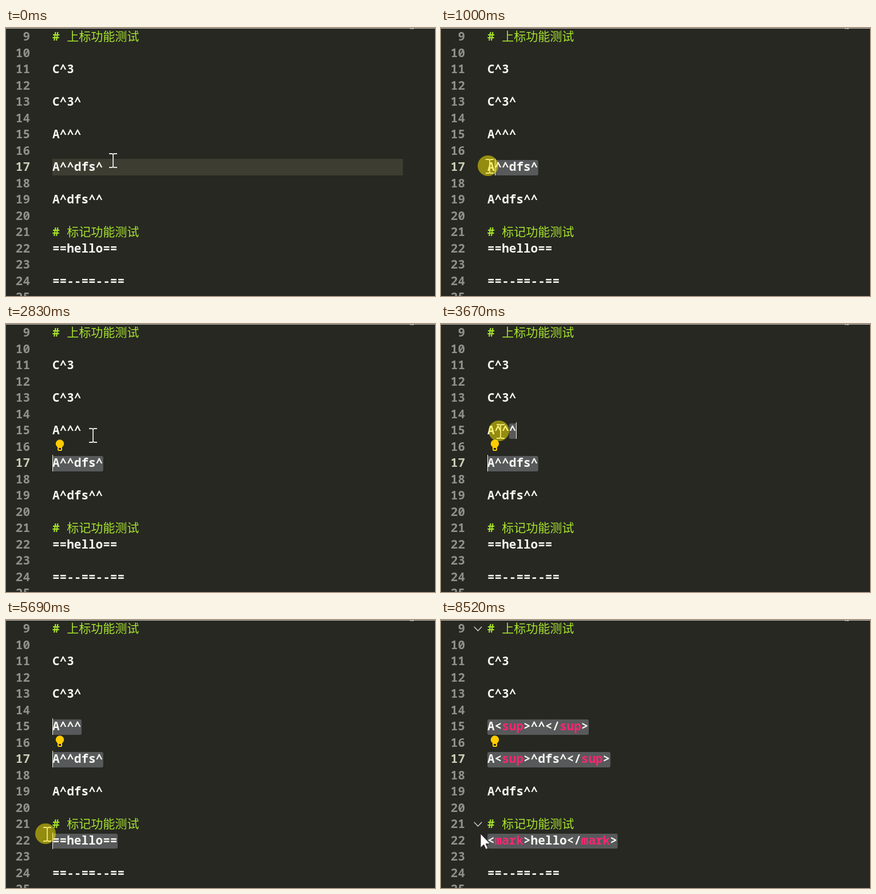
Animation, 749 px wide and 469 px high, one loop 8.7 s. Source, as an HTML page:

```html
<!DOCTYPE html>
<html lang="zh">
<head>
<meta charset="utf-8">
<style>
html, body { margin: 0; width: 100%; height: 100%; overflow: hidden; background: #272822; }
svg { display: block; }
text { font: bold 21px "Noto Sans Mono", "DejaVu Sans Mono", monospace; fill: #f8f8f2; white-space: pre; }
.num { fill: #90908a; text-anchor: end; }
.on { fill: #c8ccb4; }
.head { fill: #a6e22e; }
.han { font: 21px "Noto Sans CJK SC", "Noto Sans CJK", sans-serif; }
.tag { fill: #f92672; }
.sel { fill: #57595a; }
</style>
</head>
<body>
<svg id="stage" width="749" height="469" viewBox="0 0 749 469"></svg>
<script>
const LOOP = 8700, LEFT = 81, CH = 12.6, LINE = 28.5;
const EDIT = 7020;

// Screen capture of the pointer: time, x, y, kind
// i = beam, d = dragging beam, p = pressed beam, a = arrow
const pointer = [
  [0, 187, 232, 'i'], [160, 170, 238, 'i'], [350, 141, 231, 'd'],
  [530, 111, 227, 'd'], [670, 96, 233, 'd'], [840, 87, 238, 'd'],
  [1000, 82, 241, 'd'], [1170, 80, 242, 'p'], [1830, 81, 244, 'p'],
  [2000, 84, 246, 'p'], [2170, 86, 248, 'p'], [2500, 88, 250, 'i'],
  [2830, 152, 195, 'i'], [3170, 140, 189, 'i'], [3340, 134, 188, 'p'],
  [3510, 122, 188, 'd'], [3670, 101, 187, 'd'], [3840, 76, 187, 'd'],
  [4010, 71, 187, 'a'], [4360, 104, 250, 'i'], [4530, 170, 340, 'i'],
  [4690, 212, 378, 'i'], [4840, 224, 386, 'i'], [5000, 222, 385, 'i'],
  [5170, 220, 384, 'i'], [5340, 217, 383, 'p'], [5500, 142, 379, 'd'],
  [5690, 69, 374, 'd'], [6020, 69, 374, 'a']
];

// Selection start and caret column on each edited row: time, start, caret
const selections = {
  15: [[3340, 4, 4], [3670, 3, 4], [3840, 0, 0]],
  17: [[350, 5, 5], [530, 0, -1], [670, 2, 2], [840, 1, 1], [1330, 0, 0]],
  22: [[5340, 9, 9], [5500, 4, 4], [5690, 0, 0]]
};

const before = {
  9: '# 上标功能测试', 11: 'C^3', 13: 'C^3^', 15: 'A^^^', 17: 'A^^dfs^',
  19: 'A^dfs^^', 21: '# 标记功能测试', 22: '==hello==', 24: '==--==--=='
};
const after = {
  ...before,
  15: 'A<sup>^^</sup>', 17: 'A<sup>^dfs^</sup>', 22: '<mark>hello</mark>'
};

const at = (keys, t) => keys.filter(k => k[0] <= t).pop();
const rowTop = row => 229 + (row - 17) * LINE;
const base = row => Math.round(rowTop(row) + 21);
const col = n => LEFT + n * CH;
const esc = s => s.replace(/</g, '&lt;').replace(/>/g, '&gt;');
const text = (x, row, s, cls = '') => `<text x="${x}" y="${base(row)}" class="${cls}">${s}</text>`;
const rect = (x, y, w, h, attr) => `<rect x="${x}" y="${y}" width="${w}" height="${h}" ${attr}/>`;
const path = (d, attr) => `<path d="${d}" ${attr}/>`;

function code(row, s) {
  if (s[0] === '#')
    return text(LEFT, row, '#', 'head') + text(col(2), row, s.slice(2), 'head han');
  const parts = s.split(/(sup|mark)/);
  let n = 0, out = '';
  for (const part of parts) {
    out += text(col(n), row, esc(part), /^(sup|mark)$/.test(part) ? 'tag' : '');
    n += part.length;
  }
  return out;
}

const caret = (row, n) =>
  rect(Math.round(col(n)), Math.round(rowTop(row)), 1, 29, 'fill="#f8f8f0"');

function bulb() {
  return '<g fill="#ffcc00"><circle cx="94" cy="209.5" r="7.2"/>' +
    path('M90 214h8v6q0 2-2 2h-4q-2 0-2-2z', '') +
    rect(92, 217, 4, 3, 'fill="#272822"') + '</g>';
}

const chevron = row =>
  path(`M57.8 ${rowTop(row) + 10.8}l6.7 7 6.7-7`, 'fill="none" stroke="#c5c5c5" stroke-width="1.5"');

function drawPointer([, x, y, kind]) {
  if (kind === 'a')
    return path(`M${x} ${y}v24.5l5.6-5.3 3.7 8 3.8-1.7-3.7-7.8h7.7z`,
      'fill="#fff" stroke="#222" stroke-width="1"');
  const bx = x + (kind === 'd' ? 3 : 0), by = y + (kind === 'i' ? 0 : 1);
  const beam = path(`M${bx - 7} ${by - 12}h5.5l1.5 1.5 1.5-1.5h5.5` +
    `M${bx - 7} ${by + 12}h5.5l1.5-1.5 1.5 1.5h5.5M${bx} ${by - 11}v22`,
    'fill="none" stroke="#e4e4e0" stroke-width="1.8"');
  return beam + (kind === 'i' ? '' :
    `<circle cx="${x}" cy="${y}" r="18" fill="#fff000" fill-opacity=".5"/>`);
}

function scene(t) {
  const lines = t < EDIT ? before : after;
  const mouse = at(pointer, t);
  const twoRows = t >= 530 && t < 670;
  const blink = t < EDIT || Math.floor((t - EDIT) / 500) % 2 === 0;
  const active = twoRows ? 16 : 17;
  let back = '', front = '';

  if (t < 350) back += rect(LEFT, 229, 612, 29, 'fill="#3e3d32"');
  if (twoRows) {
    back += rect(LEFT, 201, 12, 32, 'class="sel" rx="3"');
    front += caret(16, 0);
  }
  for (const row in selections) {
    const s = at(selections[row], t);
    if (!s) continue;
    const width = (lines[row].length - s[1]) * CH;
    const y = Math.round(rowTop(+row)) + (twoRows ? 0 : 2);
    const bottom = Math.round(rowTop(+row) + LINE);
    if (width > 0) back += rect(col(s[1]), y, width + .6, bottom - y, 'class="sel" rx="3"');
    if (s[2] >= 0 && blink) front += caret(+row, s[2]);
  }

  for (let row = 9; row <= 25; row++) {
    back += text(42, row, row, row === active ? 'num on' : 'num');
    if (lines[row]) back += code(row, lines[row]);
  }
  if (t >= 1170) front += bulb();
  if (mouse[3] === 'a') front += chevron(9) + chevron(21);

  const edge = rect(0, 0, 749, 1, 'fill="#c4c4c2"') +
    rect(705, 1, 2, 1, 'fill="#aaa"') + rect(708, 1, 4, 1, 'fill="#aaa"');
  return back + front + edge + drawPointer(mouse);
}

const stage = document.getElementById('stage');
let shown = '';
function tick(now) {
  const next = scene(Math.max(0, now) % LOOP);
  if (next !== shown) stage.innerHTML = shown = next;
  requestAnimationFrame(tick);
}
tick(0);
</script>
</body>
</html>
```
